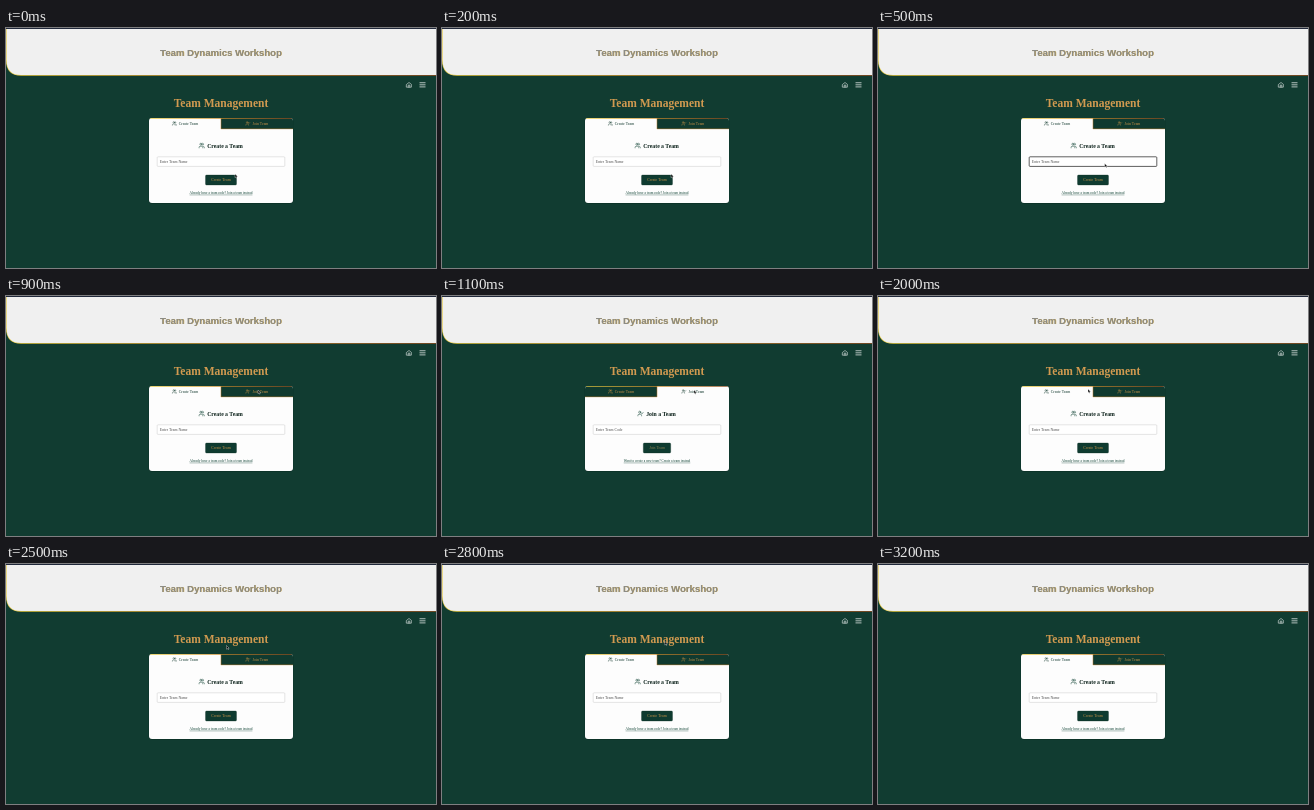
An HTML page that plays this animation: 430 px wide and 240 px high, repeating every 3.3 s.

```html
<!DOCTYPE html>
<html lang="en">
<head>
<meta charset="utf-8">
<title>Team Management</title>
<style>
  html, body { margin: 0; width: 100%; height: 100%; overflow: hidden; background: #113c31; }
  svg { display: block; width: 430px; height: 240px; }
  text { font-family: "Liberation Serif", "Times New Roman", serif; font-size: 3.84px; text-anchor: middle; }
  .left { text-anchor: start; }
  .heading { font-size: 5.76px; font-weight: bold; fill: #0b211a; }
  .link { font-size: 3.36px; fill: #0d4032; text-decoration: underline; }
  .banner { font: bold 9.6px "Liberation Sans", Arial, sans-serif; }
  .icon { fill: none; stroke-width: 2; stroke-linecap: round; stroke-linejoin: round; }
</style>
</head>
<body>
<svg viewBox="0 0 430 240">
  <defs>
    <linearGradient id="gold">
      <stop offset="0" stop-color="#e6c93f"/>
      <stop offset=".5" stop-color="#c98a2c"/>
      <stop offset="1" stop-color="#8d4a1d"/>
    </linearGradient>
    <clipPath id="cardShape"><rect x="143" y="90" width="144" height="85" rx="3"/></clipPath>
    <g id="users">
      <path d="M16 21v-2a4 4 0 0 0-4-4H6a4 4 0 0 0-4 4v2M22 21v-2a4 4 0 0 0-3-3.9M16 3.1a4 4 0 0 1 0 7.8"/>
      <circle cx="9" cy="7" r="4"/>
    </g>
    <g id="join">
      <path d="M16 21v-2a4 4 0 0 0-4-4H6a4 4 0 0 0-4 4v2M16 11l2 2 4-5"/>
      <circle cx="9" cy="7" r="4"/>
    </g>
  </defs>

  <rect width="430" height="240" fill="#113c31"/>
  <path d="M0 0H430V47.7H15Q0 47.7 0 32Z" fill="url(#gold)"/>
  <path d="M.6 1H430V47.1H15Q.6 47.1 .6 32Z" fill="#f0f0f0"/>
  <rect width="430" height="1" fill="#20283a"/>
  <text class="banner" x="215.2" y="27.8" fill="#d2a83c">Team Dynamics Workshop</text>
  <text class="banner" x="214.9" y="27.5" fill="#8b8b86">Team Dynamics Workshop</text>

  <g class="icon" stroke="#fff">
    <path transform="translate(399.9 53.7) scale(.26)" d="M3 10l9-7 9 7v11H3ZM9 21v-8h6v8"/>
    <path transform="translate(413.4 53.7) scale(.26)" d="M2 4H22M2 12H22M2 20H22" stroke-width="2.6"/>
  </g>
  <text x="215" y="79.3" style="font-size:11.52px;font-weight:bold" fill="#d19a50">Team Management</text>

  <rect x="142.8" y="90.2" width="144.4" height="85.2" rx="3" fill="#092a21"/>
  <g clip-path="url(#cardShape)">
    <rect x="143" y="90" width="144" height="85" fill="#fdfdfd"/>
    <rect id="inactiveTab" y="90" width="72" height="11" fill="#103a2f"/>
    <path id="tabEdge" fill="none" stroke="#b9792b" stroke-width=".5"/>
    <rect x="143" y="90" width="144" height=".7" fill="url(#gold)"/>
  </g>
  <g id="createTab">
    <use href="#users" class="icon" transform="translate(166 93) scale(.2)"/>
    <text class="left" x="172.8" y="97.1">Create Team</text>
  </g>
  <g id="joinTab">
    <use href="#join" class="icon" transform="translate(239.4 93) scale(.2)"/>
    <text class="left" x="246.6" y="97.1">Join Team</text>
  </g>

  <use id="headIcon" class="icon" stroke="#0d4032"/>
  <text id="heading" class="heading left" y="119.6"></text>
  <rect id="field" x="151.2" y="128.8" width="127.6" height="9.6" rx=".8" fill="#fff"/>
  <text id="hint" class="left" x="153.8" y="135" fill="#4c4c4c"></text>
  <rect id="button" y="147" height="10" rx="1" fill="#0f3b30" stroke="#092a21" stroke-width=".3"/>
  <text id="action" x="215" y="153.2"></text>
  <text id="link" class="link" x="215" y="165.8"></text>
  <path id="cursor" d="M0 0V3.7L.9 2.9 1.5 4.2 2.1 3.9 1.5 2.7H2.7Z" fill="#000" stroke="#fff" stroke-width=".35"/>
</svg>

<script>
const LOOP = 3300, STEP = 100;
const JOIN_FROM = 1000, JOIN_TO = 1900, CURSOR_END = 3100;
const $ = id => document.getElementById(id);
const set = (id, attrs) => Object.entries(attrs).forEach(([k, v]) => $(id).setAttribute(k, v));

// Cursor stops: time, x, y
const path = [
  [0, 229, 146], [200, 229, 146], [500, 226.7, 135.5], [600, 226.7, 135.5],
  [900, 252, 94], [1600, 252, 94], [1900, 210, 93], [2100, 210, 93],
  [2500, 220.5, 81.5], [3000, 224, 75], [LOOP, 224, 75]
];

const views = {
  create: {
    heading: 'Create a Team', headX: 201.2, icon: '#users', iconX: 192.6,
    hint: 'Enter Team Name', action: 'Create Team', width: 31,
    link: 'Already have a team code? Join a team instead'
  },
  join: {
    heading: 'Join a Team', headX: 204.2, icon: '#join', iconX: 195.4,
    hint: 'Enter Team Code', action: 'Join Team', width: 27.4,
    link: 'Want to create a new team? Create a team instead'
  }
};

function cursorAt(t) {
  const i = path.findIndex((p, n) => n > 0 && t <= p[0]);
  const [t0, x0, y0] = path[i - 1], [t1, x1, y1] = path[i];
  const u = (t - t0) / (t1 - t0), e = u * u * (3 - 2 * u);
  return [x0 + (x1 - x0) * e, y0 + (y1 - y0) * e];
}

function paintTab(id, active) {
  const color = active ? '#0b3328' : '#c99247';
  $(id).querySelector('use').setAttribute('stroke', color);
  $(id).querySelector('text').setAttribute('fill', color);
}

function render(t) {
  const joining = t >= JOIN_FROM && t < JOIN_TO;
  const view = joining ? views.join : views.create;
  const [x, y] = cursorAt(t);
  const focused = !joining && x > 151 && x < 279 && y > 129 && y < 138;
  const tabX = joining ? 143 : 215;

  ['heading', 'hint', 'action', 'link'].forEach(id => { $(id).textContent = view[id]; });
  set('inactiveTab', { x: tabX });
  set('tabEdge', { d: `M${tabX} 100.8h72M215 90v11` });
  paintTab('createTab', !joining);
  paintTab('joinTab', joining);
  set('heading', { x: view.headX });
  set('headIcon', { href: view.icon, transform: `translate(${view.iconX} 114.4) scale(.26)` });
  set('field', { stroke: focused ? '#1c1c1c' : '#c9c9c9', 'stroke-width': focused ? .7 : .5 });
  set('button', { x: 215 - view.width / 2, width: view.width });
  set('action', { fill: joining && t < JOIN_FROM + 200 ? '#8c8050' : '#c99247' });
  set('cursor', {
    transform: `translate(${x} ${y})`,
    visibility: t < CURSOR_END ? 'visible' : 'hidden'
  });
}

const start = performance.now();
function tick() {
  const t = (performance.now() - start) % LOOP;
  render(Math.floor(t / STEP) * STEP);
  requestAnimationFrame(tick);
}
tick();
</script>
</body>
</html>
```
